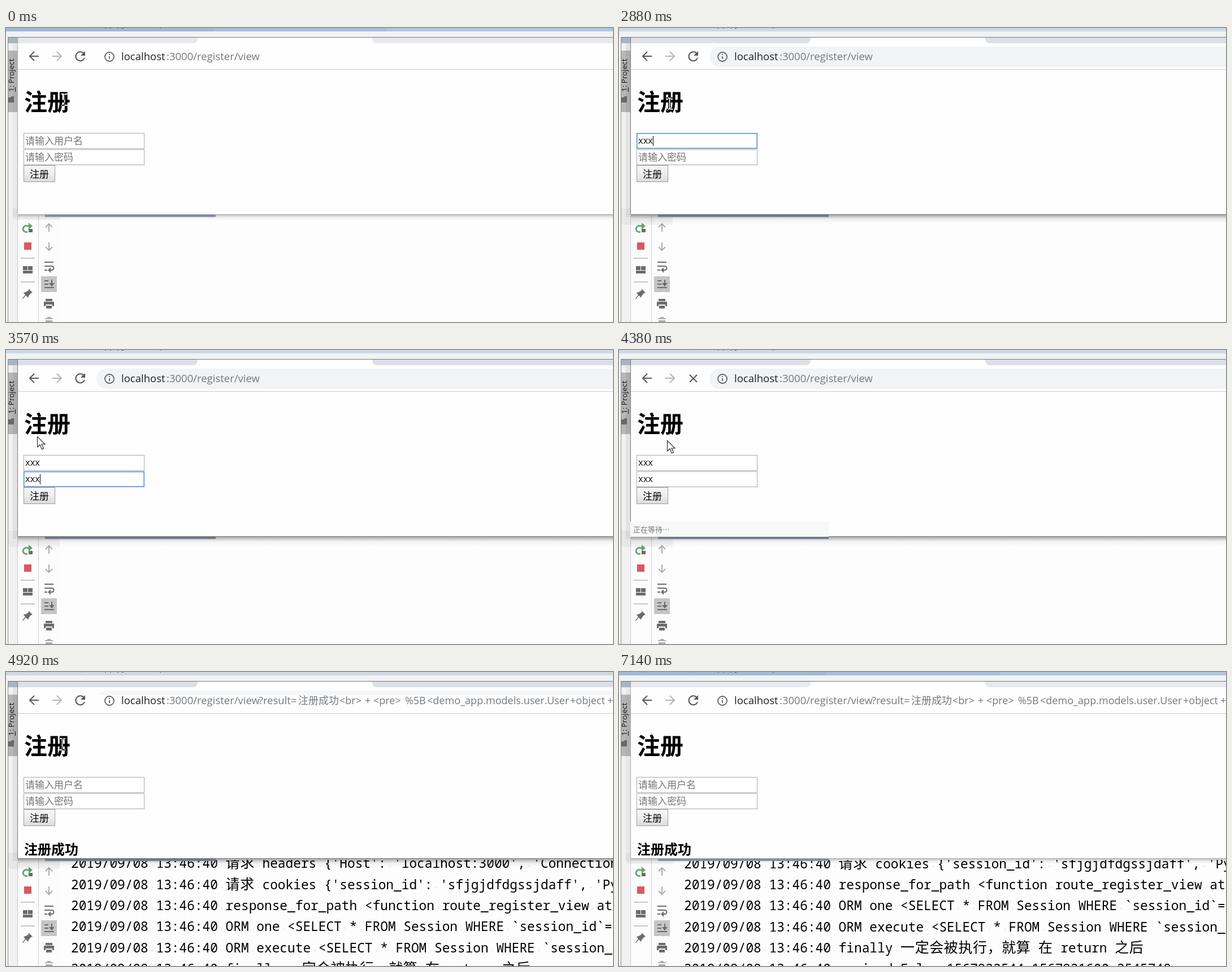
An HTML page with a canvas for the animation above (7220 ms loop, 1074 by 521 pixels).

```html
<!DOCTYPE html>
<html lang="zh-CN">
<head>
<meta charset="utf-8">
<title>Register</title>
<style>
html, body { margin: 0; width: 100%; height: 100%; overflow: hidden; background: #fdfdfd; }
canvas { display: block; }
</style>
</head>
<body>
<canvas id="stage" width="1074" height="521"></canvas>
<script>
const LOOP = 7220, W = 1074, H = 521;
const ctx = document.getElementById('stage').getContext('2d');
const CJK = '"Noto Sans CJK SC", "Noto Sans CJK", sans-serif';
const UI = '"Open Sans", ' + CJK;
const MONO = '"Noto Sans Mono", monospace';

// [time, x, y, shape]
const CURSOR = [
  [0, 103, 127, 'beam'], [2430, 102, 128, 'beam'], [2580, 98, 130, 'beam'],
  [2730, 95, 132, 'beam'], [2880, 89, 134, 'beam'], [3000, 86, 137, 'beam'],
  [3120, 82, 140, 'beam'], [3270, 79, 143, 'beam'], [3420, 62, 146, 'arrow'],
  [3570, 55, 153, 'arrow'], [3690, 52, 157, 'arrow'], [3840, 50, 205, 'arrow'],
  [3960, 52, 248, 'arrow'], [4110, 60, 230, 'arrow'], [4260, 72, 190, 'arrow'],
  [4380, 85, 160, 'arrow'], [4500, 95, 138, 'beam'], [4650, 99, 133, 'beam'],
  [4770, 99, 130, 'beam'], [4920, 99, 128, 'beam'], [6070, 124, 142, 'beam'],
  [6220, 300, 218, 'beam'], [6340, 620, 355, 'beam'], [6460, 902, 488, 'beam'],
  [6580, 0, 0, 'none']
];
const NAME = [[0, ''], [2280, 'x'], [2580, 'xx'], [2730, 'xxx'], [4500, '']];
const PASS = [[0, ''], [3270, 'x'], [3420, 'xx'], [3570, 'xxx'], [4500, '']];
const FOCUS = [[0, ''], [1970, 'name'], [3000, 'pass'], [3960, '']];
const POPUP = [[0, 0], [1970, 185], [2280, 0], [3120, 215], [3270, 0]];
const BUTTON = [[0, 'idle'], [3840, 'hover'], [3960, 'down'], [4110, 'hover'], [4260, 'idle']];
const SCROLL = [[0, null], [4650, 0], [4920, 55], [5040, 92]];
const STATUS = [[0, 0], [4380, 1], [4650, 0.4], [4920, 0]];

const LOG = [
  "请求 path 和 query /register/view {'result': '%E6%B3%A8",
  "请求 headers {'Host': 'localhost:3000', 'Connection'",
  "请求 cookies {'session_id': 'sfjgjdfdgssjdaff', 'Py",
  'response_for_path <function route_register_view at 0x',
  'ORM one <SELECT * FROM Session WHERE `session_id`=',
  'ORM execute <SELECT * FROM Session WHERE `session_id`',
  'finally 一定会被执行，就算 在 return 之后',
  'expired False 1567922544 1567921600.2545748'
];

const at = (table, t) => table.reduce((row, next) => next[0] <= t ? next : row);
const value = (table, t) => at(table, t)[1];

function rect(x, y, w, h, color) {
  ctx.fillStyle = color;
  ctx.fillRect(x, y, w, h);
}
function box(x, y, w, h, r, color) {
  ctx.fillStyle = color;
  ctx.beginPath();
  ctx.roundRect(x, y, w, h, r);
  ctx.fill();
}
function text(s, x, y, font, color) {
  ctx.font = font;
  ctx.fillStyle = color;
  ctx.fillText(s, x, y);
}
function line(d, color, width = 2) {
  ctx.strokeStyle = color;
  ctx.lineWidth = width;
  ctx.stroke(new Path2D(d));
}
function shape(d, color) {
  ctx.fillStyle = color;
  ctx.fill(new Path2D(d));
}
function clipped(x, y, w, h, draw) {
  ctx.save();
  ctx.beginPath();
  ctx.rect(x, y, w, h);
  ctx.clip();
  draw();
  ctx.restore();
}
function ramp(y0, y1, ...colors) {
  const g = ctx.createLinearGradient(0, y0, 0, y1);
  colors.forEach((c, i) => g.addColorStop(i / (colors.length - 1), c));
  return g;
}

function logLine(s, y) {
  let x = 115;
  for (const ch of '2019/09/08 13:46:40 ' + s) {
    const wide = ch > '\u2fff';
    if (ch === ' ') rect(x + 6, y - 4, 2, 2, '#e0e0e0');
    else if (wide) text(ch, x, y, '300 25px ' + CJK, '#000');
    else text(ch, x, y, '22.8px ' + MONO, '#000');
    x += wide ? 25.6 : 13.68;
  }
}

function frameTop(active) {
  rect(0, 0, W, 17, '#f1f2f3');
  if (active) {
    rect(0, 0, W, 6, '#cdd9e5');
  } else {
    rect(0, 0, 368, 6, '#9dbad7');
    rect(368, 0, 306, 6, '#a3c0de');
    rect(674, 0, 400, 6, '#adc8e3');
  }
  text('web [C:\\code\\web] - …\\app.py - development', 5, -3, '15px ' + UI, '#333');
  rect(3, 16, W, 1, '#777');
}

function sidebar() {
  rect(0, 17, 3, H, '#fdfdfd');
  rect(4, 17, 16, H, '#f1f1f1');
  rect(3, 16, 1, H, '#858585');
  rect(4, 17, 17, 10, '#a4b5c5');
  rect(4, 40, 16, 109, '#b7b7b7');
  ctx.save();
  ctx.translate(14, 113);
  ctx.rotate(-Math.PI / 2);
  text('1: Project', 0, 0, '13.5px ' + UI, '#111');
  rect(0, 2, 8, 1, '#111');
  ctx.restore();
  shape('M4 132V123H8L10 121H14V132Z', '#6a6a6a');
}

function tools(grey) {
  rect(21, 332, 74, H, grey ? '#f2f2f2' : '#fcfcfc');
  rect(20, 332, 1, H, '#c9c9c9');
  rect(57, 332, 1, H, '#d0d0d0');
  const dark = '#6b6b6b', light = '#adadad';

  line('M41 351H38A5.5 5.5 0 1 0 38 361', '#59a869', 2.8);
  shape('M40 345L47 351L40 357Z', '#59a869');
  rect(40, 356, 7, 6, dark);
  rect(32, 380, 13, 13, '#db5860');
  rect(26, 407, 25, 2, '#c8c8c8');
  rect(26, 449, 25, 2, '#c8c8c8');
  rect(30, 422, 8, 7, dark);
  rect(39, 422, 8, 7, dark);
  rect(30, 430, 17, 5, dark);
  shape('M40 462L47 469L44 470L40 475L39 478L35 474L30 480L29 479L34 473L31 469L35 468L40 465Z', dark);

  line('M76 361V348M70 353L76 347L82 353', light);
  line('M76 380V394M70 388L76 394L82 388', light);
  line('M68 415H84M68 422H81A3.5 3.5 0 0 1 81 429H77M68 429H73', dark);
  shape('M79 424V434L74 429Z', dark);
  rect(62, 440, 28, 28, '#c5c5c5');
  line('M68 448H75M68 454H75M68 460H85M81 446V455', dark);
  shape('M76 452H86L81 458Z', dark);
  rect(70, 480, 12, 4, dark);
  shape('M67 485H85V493H82V490H70V493H67Z', dark);
  rect(71, 492, 10, 5, dark);
  rect(73, 512, 6, 2, light);
  rect(69, 514, 14, 2, light);
  rect(70, 518, 12, 3, light);
}

function shadow(active) {
  const reach = active ? 15 : 9;
  box(active ? 4 : 12, 320, active ? 91 : 83, active ? 29 : 20, [0, 0, 0, 6], 'rgba(0,0,0,.045)');
  rect(12, 27, 9, 308, active ? 'rgba(0,0,0,.06)' : 'rgba(0,0,0,.04)');
  rect(69, 331, 302, 4, '#9ca8bf');
  rect(21, 331, W, reach, ramp(331, 331 + reach,
    active ? 'rgba(0,0,0,.34)' : 'rgba(0,0,0,.22)', 'rgba(0,0,0,.06)', 'rgba(0,0,0,0)'));
}

function browser(t, active, done) {
  rect(21, 17, W, 314, '#fefefe');
  const strip = active ? '#dee0e7' : '#e8e9ec';
  box(21, 17, 318, 10, [0, 0, 8, 0], strip);
  box(648, 17, 440, 10, [0, 0, 0, 8], strip);
  if (active) {
    clipped(160, 33, W, done ? 8 : 36, () => box(160, 33, 960, 36, 18, done ? '#f5f6f7' : '#f1f3f4'));
  }
  rect(21, 73, W, 1, '#c9cacc');

  line('M58 50H42M50 42L42 50L50 58', '#55585c');
  line('M82 50H98M90 42L98 50L90 58', '#b4b6b8');
  if (t >= 4110 && t < 4500) {
    line('M125 44L138 57M138 44L125 57', '#55585c');
  } else {
    line('M137.5 45A8 8 0 1 0 139 53', '#55585c');
    shape('M140 41V49H132Z', '#55585c');
  }
  line('M175 51A8 8 0 1 0 191 51A8 8 0 1 0 175 51M183 50V55M183 46V48', '#5f6368', 1.8);

  address(done);
  page(t, done);
  rect(20, 17, 1, 314, active ? '#777' : '#a5a5a5');
  rect(20, 330, W, 1, active ? '#777' : '#a9a9a9');
  status(value(STATUS, t));
}

function address(done) {
  const font = '18.5px ' + UI, grey = '#75797d';
  text('localhost', 204, 57, font, '#202124');
  text(':3000/register/view', 284, 57, font, grey);
  if (!done) return;
  text('?result=', 447, 57, font, grey);
  text('注册成功', 517, 57, '18px ' + CJK, grey);
  [['<br>', 590], ['+', 635], ['<pre>', 650], ['%5B', 706],
   ['<demo_app.models.user.User', 745], ['+object', 998], ['+', 1064]]
    .forEach(([s, x]) => text(s, x, 57, '18px ' + UI, grey));
}

function field(y, typed, hint, focused) {
  rect(31, y, 214, 28, focused ? '#4a86d8' : '#a9a9a9');
  const b = focused ? 1.5 : 1;
  rect(31 + b, y + b, 214 - 2 * b, 28 - 2 * b, '#fff');
  if (typed) text(typed, 34, y + 19, '16.5px ' + UI, '#111');
  else text(hint, 34, y + 19.5, '17px ' + CJK, '#757575');
  if (focused) rect(typed ? 34 + typed.length * 8.65 : 35, y + 5, 1, 18, '#000');
}

function button(state) {
  rect(31, 243, 56, 30, state === 'idle' ? '#9b9b9b' : '#777');
  const fill = {
    idle: ['#f6f6f6', '#eeeeee', '#dcdcdc'],
    hover: ['#fafafa', '#f2f2f2', '#e2e2e2'],
    down: ['#dcdcdc', '#e4e4e4', '#ededed']
  }[state];
  rect(32, 244, 54, 28, ramp(244, 272, ...fill));
  text('注册', 42, 265, '17px ' + CJK, '#000');
}

function page(t, done) {
  text('注册', 32, 146, 'bold 41px ' + CJK, '#000');
  const focus = value(FOCUS, t);
  field(186, value(NAME, t), '请输入用户名', focus === 'name');
  field(215, value(PASS, t), '请输入密码', focus === 'pass');
  button(value(BUTTON, t));
  if (done) clipped(21, 290, W, 40, () => text('注册成功', 32, 323, 'bold 24px ' + CJK, '#000'));
}

function status(alpha) {
  ctx.save();
  ctx.globalAlpha = alpha;
  box(20, 304, 351, 27, [0, 4, 0, 0], '#f8f8f8');
  text('正在等待…', 25, 323, '13px ' + CJK, '#777');
  ctx.restore();
}

function popup(bottom) {
  clipped(21, 17, 300, 210, () => {
    ctx.save();
    ctx.shadowColor = 'rgba(0,0,0,.35)';
    ctx.shadowBlur = 4;
    ctx.shadowOffsetY = 1;
    box(30.5, 0, 247, bottom, 4, '#fefefe');
    ctx.restore();
    ['gg', 'ggg', 'qqq', 'ywo'].forEach((s, i) =>
      text(s, 46, bottom - 27 - i * 46.7, '18px ' + UI, '#111'));
  });
}

function cursor([, x, y, kind]) {
  ctx.save();
  ctx.translate(x, y);
  if (kind === 'beam') {
    ctx.globalCompositeOperation = 'difference';
    line('M-5 -10H-1.5L0.5 -9L2.5 -10H6M0.5 -9V9M-5 10H-1.5L0.5 9L2.5 10H6', '#fff', 1.8);
  } else if (kind === 'arrow') {
    const d = 'M.5 .5V19L5 15L8.5 23L11.5 21.5L8 14H14Z';
    shape(d, '#fff');
    line(d, '#222', 1.1);
  }
  ctx.restore();
}

function draw(t) {
  const active = t >= 1970 && t < 7140, done = t >= 4500;
  rect(0, 0, W, H, '#fdfdfd');
  frameTop(active);
  sidebar();
  tools(t >= 4650 && t < 4920);
  const scroll = value(SCROLL, t);
  if (scroll !== null) {
    clipped(95, 333, W, H, () => LOG.forEach((s, i) => {
      const y = 365 + i * 37.3 - scroll;
      if (y > 330 && y < 545) logLine(s, y);
    }));
  }
  shadow(active);
  browser(t, active, done);
  const bottom = value(POPUP, t);
  if (bottom) popup(bottom);
  cursor(at(CURSOR, t));
}

function tick() {
  draw(performance.now() % LOOP);
  requestAnimationFrame(tick);
}
tick();
</script>
</body>
</html>
```
